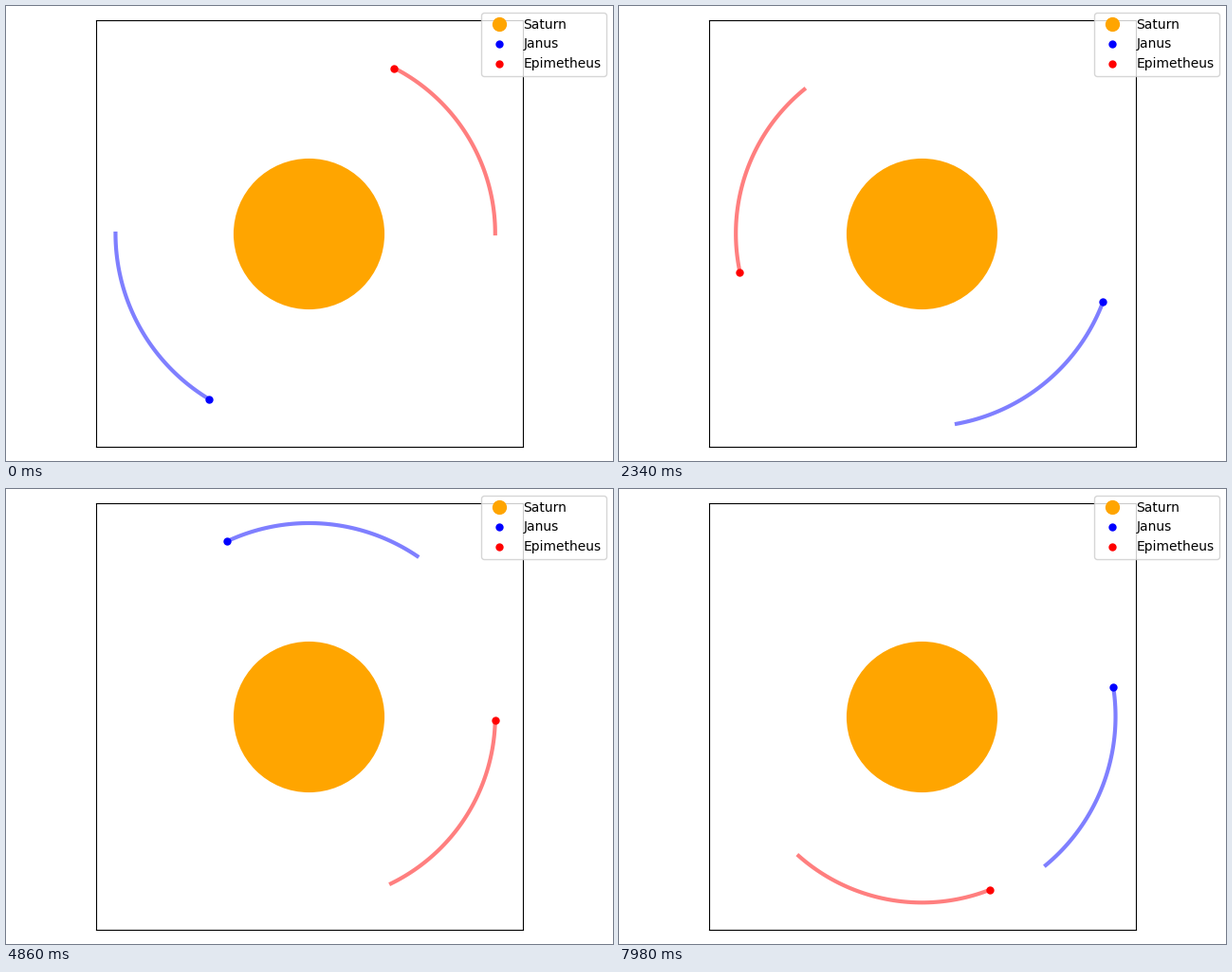
A matplotlib script that plays this animation: 640 by 480 pixels, repeating every 8000 ms.

```python
import numpy as np
import matplotlib.pyplot as plt
from matplotlib.animation import FuncAnimation
from matplotlib.lines import Line2D

TICK = 20          # ms per animation frame
HOLD = 3           # frames each pose stays on screen
LOOP = 8000        # ms
TRAIL_STEPS = 5    # poses covered by a trail

# label, colour, orbit radius (px), start angle and degrees per pose
MOONS = [
    ("Janus", "blue", 204.03, 180.0, 11.8027),
    ("Epimetheus", "red", 196.3, 0.0, 12.545),
]

fig = plt.figure(figsize=(6.4, 4.8), dpi=100)
ax = fig.add_axes([95 / 640, 15 / 480, 450 / 640, 450 / 480])
# one data unit is one pixel
ax.set_xlim(-224.49, 225.51)
ax.set_ylim(-225, 225)
ax.set_xticks([])
ax.set_yticks([])

ax.plot(0, 0, "o", color="orange", ms=114.6, mew=0)


def orbit(radius, degrees):
    a = np.radians(degrees)
    return radius * np.cos(a), radius * np.sin(a)


trails = [ax.plot([], [], color=color, lw=3, alpha=0.5)[0]
          for _, color, *_ in MOONS]
dots = [ax.plot([], [], "o", color=color, ms=5)[0]
        for _, color, *_ in MOONS]


def handle(label, color, size):
    return Line2D([], [], ls="none", marker="o", color=color, ms=size,
                  label=label)


fig.legend(handles=[handle("Saturn", "orange", 10)]
           + [handle(label, color, 5) for label, color, *_ in MOONS])


def update(i):
    step = i // HOLD
    path = np.linspace(step, step + TRAIL_STEPS, 60)
    for (_, _, radius, start, speed), trail, dot in zip(MOONS, trails, dots):
        x, y = orbit(radius, start + speed * path)
        trail.set_data(x, y)
        dot.set_data(x[-1:], y[-1:])
    return trails + dots


anim = FuncAnimation(fig, update, frames=LOOP // TICK, interval=TICK,
                     repeat=True, repeat_delay=0, blit=False)
plt.show()
```
